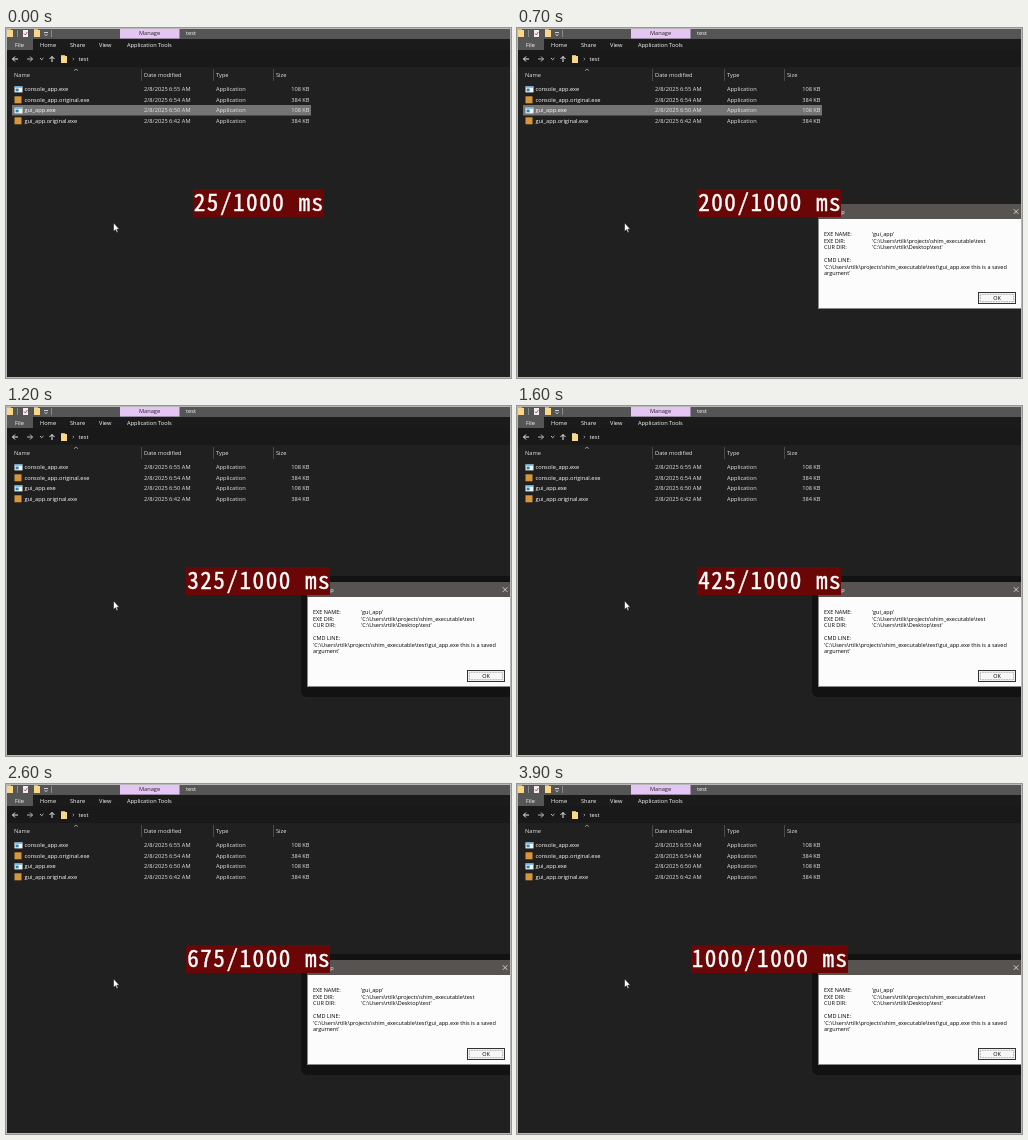
Write an HTML page that moves like this. It is 505 px wide and 350 px high and loops after 4 s.

```html
<!DOCTYPE html>
<html lang="en">
<head>
<meta charset="utf-8">
<title>Launch timer</title>
<style>
html, body { margin: 0; width: 100%; height: 100%; overflow: hidden; background: #202020; }
svg { display: block; width: 505px; height: 350px; }
text { font: 5.68px "Open Sans", "Noto Sans", sans-serif; fill: #fafafa; white-space: pre; }
.dim { fill: #e4e4e4; }
.end { text-anchor: end; }
.mid { text-anchor: middle; }
.ink { font-size: 5.5px; fill: #000; }
.digit {
  font: 23.2px "Noto Sans Mono CJK JP", "Noto Sans Mono", monospace;
  fill: #fff; stroke: #fff; stroke-width: .4; text-anchor: middle;
}
.line { fill: none; stroke: #eee; stroke-width: 1; }
.thin { stroke-width: .8; }
</style>
</head>
<body>
<svg id="stage" viewBox="0 0 505 350">
  <rect width="505" height="350" fill="#202020"/>
  <rect width="505" height="11" fill="#555"/>
  <rect y="11" width="505" height="11" fill="#1b1b1b"/>
  <rect y="22" width="505" height="17" fill="#191919"/>
  <rect x="1" y="11" width="26" height="11" fill="#555"/>
  <rect x="114" y="1" width="59.5" height="9.5" fill="#e5c5f3"/>
  <g id="chrome">
    <path d="M11.5 2v7M45.5 2v7" stroke="#999" stroke-width=".8"/>
    <path d="M17 2h5v7h-5z" fill="#eee"/>
    <path d="M18 5.5l1.3 1.5 2-3" class="line thin" style="stroke:#a33"/>
    <path d="M38 4.5h4M38.4 6.2l1.6 1.4 1.6-1.4" class="line thin"/>
    <path d="M12 31H6.5M9 28.5L6.5 31 9 33.5" class="line"/>
    <path d="M21 31h5.5M24 28.5l2.5 2.5-2.5 2.5" class="line" style="stroke:#bbb"/>
    <path d="M34 30l1.7 1.7 1.7-1.7" class="line thin"/>
    <path d="M46 34v-5.5M43.5 31l2.5-2.5 2.5 2.5" class="line"/>
    <path d="M66.7 29.8l1.2 1.2-1.2 1.2" class="line thin" style="stroke:#aaa"/>
    <path d="M68 42.7l2-1.7 2 1.7" class="line thin" style="stroke:#aaa"/>
    <path d="M135.5 41v12M207.5 41v12M267.5 41v12" stroke="#555" stroke-width=".8"/>
  </g>
  <rect id="pick" x="6" y="77" width="299" height="10.5" fill="#747474"/>
  <g id="files"></g>
  <path d="M107.5 194.8v8.7l2-1.8 1.3 3 1.3-.6-1.3-2.9h2.6z" fill="#fff" stroke="#000" stroke-width=".5"/>
  <rect id="shadow" x="295" y="170" width="220" height="121" rx="6" fill="#121212"/>
  <g id="dialog">
    <rect x="301" y="176" width="204" height="105" fill="#8a8a8a"/>
    <rect x="302" y="190" width="203" height="90" fill="#fcfcfc"/>
    <rect x="301" y="176" width="204" height="15" fill="#575350"/>
    <path d="M496.8 181.3l4.6 4.6M501.4 181.3l-4.6 4.6" class="line thin"/>
    <rect x="461.5" y="264.5" width="37" height="11" fill="#f6f6f6" stroke="#333"/>
    <rect x="463.3" y="266.3" width="33.4" height="7.4" fill="none" stroke="#555" stroke-width=".6" stroke-dasharray=".8 .8"/>
  </g>
  <rect x=".5" y=".5" width="504" height="349" fill="none" stroke="#b8b8b8"/>
  <g id="counter"></g>
</svg>
<script>
const NS = "http://www.w3.org/2000/svg";
const LOOP = 4000, STEP = 100, CELL = 13.08, CENTER = 252.4;
const $ = id => document.getElementById(id);

function add(parent, tag, attrs, content = "") {
  const el = document.createElementNS(NS, tag);
  for (const k in attrs) el.setAttribute(k, attrs[k]);
  el.textContent = content;
  parent.append(el);
  return el;
}
const label = (parent, x, y, str, cls = "") => add(parent, "text", { x, y, class: cls }, str);
const box = (parent, x, y, width, height, fill) => add(parent, "rect", { x, y, width, height, fill });

function folder(x, y) {
  box($("chrome"), x, y, 4, 2, "#e5ad38");
  box($("chrome"), x, y + 1, 6, 7, "#f8d888");
}

folder(1, 1);
folder(28, 1);
folder(55, 27);
[["File", 9], ["Home", 34], ["Share", 64], ["View", 93], ["Application Tools", 121]]
  .forEach(([s, x]) => label($("chrome"), x, 18.8, s));
label($("chrome"), 143.5, 7.2, "Manage", "mid").style.fill = "#222";
label($("chrome"), 180, 7.4, "test");
label($("chrome"), 72.5, 33, "test");
[["Name", 8], ["Date modified", 138], ["Type", 210], ["Size", 270]]
  .forEach(([s, x]) => label($("chrome"), x, 49.2, s, "dim"));

[["console_app.exe", "6:55", 108], ["console_app.original.exe", "6:54", 384],
 ["gui_app.exe", "6:50", 108], ["gui_app.original.exe", "6:42", 384]]
  .forEach(([name, time, size], i) => {
    const g = $("files"), y = 63.4 + i * 10.5;
    if (i % 2) {
      box(g, 8.5, y - 5.6, 7, 7, "#d8963a");
    } else {
      box(g, 8.5, y - 5, 8, 6, "#f4f4f4");
      box(g, 8.5, y - 5, 8, 1.3, "#5aa9dc");
      box(g, 9.6, y - 2.8, 3, 2.7, "#2583c8");
    }
    label(g, 18.5, y, name);
    label(g, 138, y, `2/8/2025 ${time} AM`, "dim");
    label(g, 210, y, "Application", "dim");
    label(g, 303.5, y, size + " KB", "dim end");
  });

const home = "'C:\\Users\\rtilk\\", project = home + "projects\\shim_executable\\test";
label($("dialog"), 307, 185.6, "gui_app");
[[307, 208, "EXE NAME:"], [355, 208, "'gui_app'"],
 [307, 214.5, "EXE DIR:"], [355, 214.5, project],
 [307, 221, "CUR DIR:"], [355, 221, home + "Desktop\\test'"],
 [307, 234.2, "CMD LINE:"], [307, 240.8, project + "\\gui_app.exe this is a saved"],
 [307, 247.3, "argument'"]]
  .forEach(([x, y, s]) => label($("dialog"), x, y, s, "ink"));
label($("dialog"), 480, 272, "OK", "ink mid");

function drawCounter(ms) {
  const g = $("counter"), str = ms + "/1000 ms", width = str.length * CELL;
  const left = CENTER - width / 2;
  g.replaceChildren();
  box(g, Math.round(left), 161, Math.round(width), 28, "#6a0606");
  [...str].forEach((c, i) => {
    if (c !== " ") label(g, left + (i + .5) * CELL, 183, c, "digit");
  });
}

const show = (id, on) => $(id).style.display = on ? "" : "none";
const start = performance.now();
let last = -1;

function frame() {
  const step = Math.floor((performance.now() - start) % LOOP / STEP);
  if (step !== last) {
    last = step;
    drawCounter((step + 1) * 25);
    show("dialog", step >= 7);
    show("shadow", step >= 8);
    show("pick", step < 8);
  }
  requestAnimationFrame(frame);
}
frame();
</script>
</body>
</html>
```
